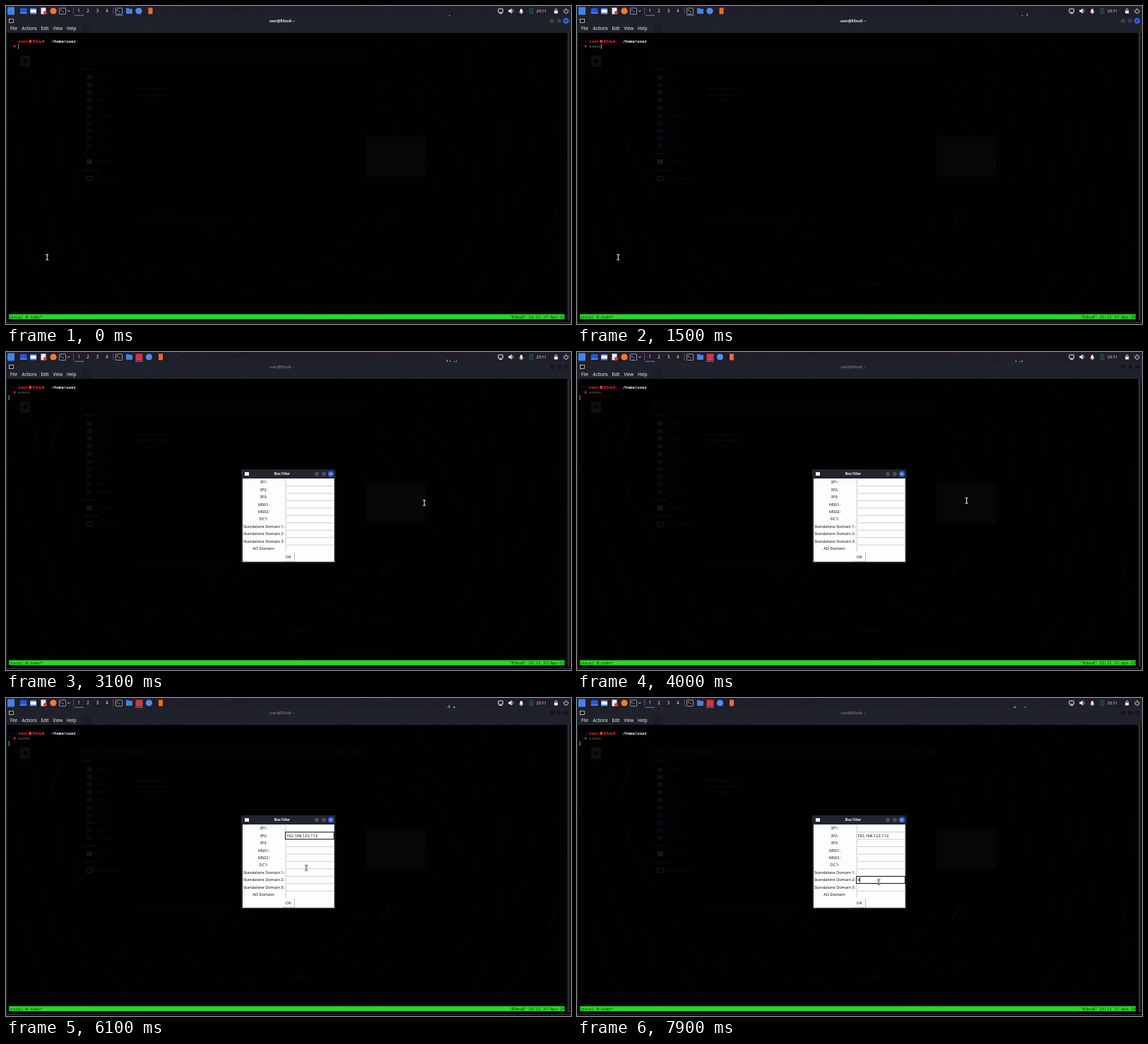
Recreate the animation shown at these times as an HTML page. Size 800 by 450 pixels, loop 8000 ms.

```html
<!DOCTYPE html>
<html lang="en">
<head>
<meta charset="utf-8">
<title>Terminal with a form</title>
<style>
html, body { margin: 0; width: 100%; height: 100%; overflow: hidden; background: #000; }
svg { display: block; width: 800px; height: 450px; }
text { font-family: "Noto Sans", "Open Sans", sans-serif; white-space: pre; }
.mono { font-family: "Noto Sans Mono", "DejaVu Sans Mono", monospace; font-size: 5.67px; }
</style>
</head>
<body>
<svg viewBox="0 0 800 450">
  <clipPath id="top"><path d="M0 0h800v14H0z"/></clipPath>
  <clipPath id="bars"><path d="M0 14h800v24H0z"/></clipPath>
  <g id="base"></g><g id="live"></g>
</svg>
<script>
const LOOP = 8000, HOST = 'R3nu8', USER = 'user', APP = 'Box Filler';
const COL = 3.4, LEFT = 3.7;
const LABELS = ['IP1', 'IP2', 'IP3', 'MS01', 'MS02', 'DC1', 'Standalone Domain 1',
  'Standalone Domain 2', 'Standalone Domain 3', 'AD Domain'];

const rect = (x, y, w, h, fill, extra = '') =>
  `<rect x="${x}" y="${y}" width="${w}" height="${h}" fill="${fill}" ${extra}/>`;
const disc = (x, y, r, fill, extra = '') =>
  `<circle cx="${x}" cy="${y}" r="${r}" fill="${fill}" ${extra}/>`;
const line = (d, stroke, w = 1) =>
  `<path d="${d}" fill="none" stroke="${stroke}" stroke-width="${w}"/>`;
const text = (x, y, s, fill, size, extra = '') =>
  `<text x="${x}" y="${y}" fill="${fill}" font-size="${size}" ${extra}>${s}</text>`;
const mid = (x, y, s, fill, size, extra = '') =>
  text(x, y, s, fill, size, `text-anchor="middle" ${extra}`);
const mono = (col, y, s, fill, bold) =>
  text(LEFT + col * COL, y, s, fill, 5.67, `class="mono" font-weight="${bold ? 700 : 400}"`);

// Swirling streaks of the wallpaper: angles from a0 over a span
function swirl(count, a0, span, rMin, rMax, tints) {
  let seed = 11, out = '';
  const rnd = () => (seed = seed * 16807 % 2147483647) / 2147483647;
  for (let i = 0; i < count; i++) {
    const r = rMin + rnd() * (rMax - rMin), a = a0 + rnd() * span, b = a + .03 + rnd() * .14;
    const at = q => `${(400 + r * Math.cos(q)).toFixed(1)} ${(220 + r * Math.sin(q)).toFixed(1)}`;
    out += line(`M${at(a)}A${r} ${r} 0 0 1 ${at(b)}`, tints[i % tints.length], .5 + rnd());
  }
  return out;
}

// File manager showing through the terminal
function ghost() {
  const ink = '#0a0d0e';
  let out = rect(105, 39, 403, 266, '#010102') + rect(105, 68, 403, 13, '#020303');
  for (const x of [116, 140, 153, 167, 475, 499]) out += disc(x, 75, 2.2, '#080a0a');
  out += text(176, 77, 'home', ink, 5);
  ['Computer', 'user', 'Desktop', 'Recent', 'Trash', 'Documents', 'Music', 'Pictures', 'Videos', 'Downloads']
    .forEach((s, i) => {
      const y = 101 + i * 10.8;
      out += rect(114, y - 3, 8, 6, i > 4 ? '#040a12' : '#0b0e10', 'rx="1"') + text(125, y + 2, s, ink, 5);
    });
  [['Places', 89], ['Devices', 209], ['Network', 232]].forEach(([s, y]) =>
    out += text(109, y + 2, s, '#0d1010', 5, 'font-weight="700"'));
  out += rect(114, 217, 8, 7, '#141617') + text(125, 222, 'File System', ink, 5);
  out += rect(114, 241, 8, 6, 'none', 'stroke="#1b1d1e"') + text(125, 246, 'Browse Network', ink, 5);
  ['Files_Example_list', 'and_some_Notes', '.pdf'].forEach((s, i) =>
    out += mid(206, 119 + i * 8, s, '#0f1212', 5.4));
  out += text(183, 300, '1 file: 23.4 MiB (24,536,064 bytes), Free space: 41 GiB', '#090b0b', 5.4);
  out += rect(20, 70, 14, 16, '#0e0f0f', 'rx="1"') + disc(27, 78, 3, '#040404');
  return out + mid(27, 99, 'Trash', '#0b0c0c', 5);
}

const terminalIcon = x => rect(x - 4.5, 3, 9, 8.5, '#14161c', 'stroke="#b9bcc4" stroke-width=".8" rx=".8"') +
  line(`M${x - 3} 5l1.5 1.2-1.5 1.2M${x - .5} 8h2.5`, '#e6e6e6', .7);

function panel() {
  const sky = tints => swirl(260, -2.75, 2.36, 200, 480, tints);
  let out = rect(0, 0, 800, 14, '#211d2a') + rect(0, 14, 800, 24, '#20222b');
  out += `<g clip-path="url(#top)">${sky(['#3a2040', '#191822', '#2b2533'])}</g>`;
  out += `<g clip-path="url(#bars)">${sky(['#23222d', '#1d1f27'])}</g>`;
  out += rect(108, 24, 13, 14, '#1b1d25') + rect(199, 29, 6, 6, '#1c2535');
  out += rect(2, 1.5, 10, 11, '#3d86ee', 'rx="1"');
  out += rect(20, 3, 9.5, 8, '#2457d8', 'rx=".6"') + rect(20, 9, 9.5, 2, '#4a7ff0');
  out += rect(34, 3, 9, 8.5, '#4b80ee', 'rx=".6"') + rect(34.5, 5, 8.5, 4.5, '#f0f3f8');
  out += rect(49.5, 2.5, 7, 9, '#eceef2') + disc(55.5, 9.5, 2.5, '#d93a3a');
  out += disc(67, 7, 4.6, '#f5792b') + terminalIcon(80);
  out += line('M87 6l1.8 2 1.8-2', '#ddd', .8);
  out += line('M95.5 2v10M152 2v10', '#62656f', .8);
  [103, 116, 129.5, 143].forEach((x, i) => out += mid(x, 9.2, i + 1, '#e4e6ea', 6.2));
  out += rect(97, 12.6, 13, 1.4, '#2f6be6') + terminalIcon(160);
  out += rect(170, 4, 9, 7, '#3d83e8', 'rx=".7"') + rect(170, 3, 4, 2, '#3d83e8');

  out += rect(697, 4, 6.5, 5, 'none', 'stroke="#f1f1f1" rx=".6"') + line('M698.5 10.5h4', '#f1f1f1');
  out += '<path d="M711.5 5.5h2l2.5-2.2v7.5l-2.5-2.2h-2z" fill="#f1f1f1"/>' +
    line('M717 4.5q2 2.5 0 5', '#f1f1f1', .8);
  out += '<path d="M726.5 9.5q1.2-1 1.2-3.3a1.8 2.2 0 0 1 3.7 0q0 2.3 1.2 3.3z" fill="#f1f1f1"/>' +
    disc(729.6, 10.4, .9, '#f1f1f1');
  out += rect(741.5, 3.5, 4.5, 7.5, '#143d28', 'stroke="#276645" stroke-width=".8" rx=".6"');
  out += text(751, 9.2, '23:11', '#f0f0f0', 5.6);
  out += rect(776.3, 6.5, 5, 4, '#f1f1f1') + line('M777.3 6.5v-1a1.5 1.6 0 0 1 3 0v1', '#f1f1f1', .9);
  out += line('M791.2 4.8a3 3 0 1 0 3.6 0M793 3v4', '#f1f1f1', .9);

  out += rect(4.5, 18.5, 6, 5, '#111', 'stroke="#d8d8d8" stroke-width=".8"');
  [['File', 6], ['Actions', 22.5], ['Edit', 49.5], ['View', 66.5], ['Help', 86]].forEach(([s, x]) =>
    out += text(x, 34.4, s, '#f2f2f2', 6.2, 'font-weight="500"'));
  return out;
}

function prompt() {
  const blue = '#142a80', red = '#ef3038';
  return mono(0, 52, '┌──(', blue) + mono(4, 52, 'root', red, 1) +
    disc(LEFT + 9 * COL, 50, 2.3, red) + mono(10, 52, HOST, red, 1) +
    mono(15, 52, ')-[', blue) + mono(18, 52, '/home/' + USER, '#f2f2f2', 1) + mono(28, 52, ']', blue) +
    mono(0, 59.2, '└─', blue) + mono(2, 59.2, '#', red, 1);
}

function statusBar() {
  const right = `"${HOST}" 23:11 17-Apr-25`;
  return rect(4, 436.2, 787, 7, '#22dc20') + mono(0, 441.6, '[oscp] 0:sudo*', '#063006') +
    text(791, 441.6, right, '#063006', 5.67, 'class="mono" text-anchor="end"');
}

const frame = () => rect(0, 38, 2, 412, '#15171d') + rect(795, 38, 2.8, 407, '#2e3035') +
  rect(797.8, 38, 2.2, 412, '#101116') + rect(0, 447, 800, 2, '#24262e');

base.innerHTML = rect(0, 0, 800, 450, '#010101') +
  swirl(300, 0, 6.283, 95, 440, ['#09060b', '#060608', '#0b060b']) + ghost() +
  rect(509, 185, 85, 57, '#060607') + panel() + frame() + prompt() + statusBar();

// Pointer stops: time, x, y
const PATH = [[0, 58, 355], [2400, 58, 355], [3000, 592, 213], [3800, 592, 213], [4700, 409, 199],
  [5400, 409, 199], [5800, 424, 231], [6000, 424, 231], [6100, 425, 240], [6300, 381, 288],
  [6400, 381, 288], [6800, 412, 246], [7000, 412, 246], [7300, 425, 248], [7400, 425, 248],
  [7600, 427, 260], [8000, 427, 260]];

function pointerAt(t) {
  const i = PATH.findIndex(p => p[0] > t), [t0, x0, y0] = PATH[i - 1], [t1, x1, y1] = PATH[i];
  const k = (t - t0) / (t1 - t0);
  return [x0 + (x1 - x0) * k, y0 + (y1 - y0) * k];
}

function pointer([x, y]) {
  const d = `M${x - 1.6} ${y - 3.3}h3.8M${x + .3} ${y - 3.3}v7.4M${x - 1.6} ${y + 4.1}h3.8`;
  return line(d, '#333', 1.9) + line(d, '#e8e8e8', .9);
}

// Load meter: birth time and height of each spike, drifting left
const SPIKES = [[-1200, 1], [600, 1], [1475, 3], [1970, 2], [2720, 1], [3100, 2], [4600, 1.5],
  [4850, 4], [5600, 2], [5800, 2], [7500, 1.5]];
const meter = t => SPIKES.map(([born, h]) => {
  const x = 637 - (t - born) * .008;
  return x > 637 || x < 618 ? '' : rect(x.toFixed(1), 14 - h, 1.4, h, h > 1 ? '#35c79a' : '#c9d6d6');
}).join('');

const tasks = open => {
  const x = open ? 202.5 : 188;
  return (open ? rect(183.5, 2.5, 10, 9.5, '#d4343f', 'rx=".6"') : '') +
    rect(open ? 183 : 155, 12.6, 11, 1.4, '#2f6be6') +
    disc(x, 7, 4.6, '#4a8df0') + rect(x + 13.5, 2.5, 6, 9, '#ee6a2e', 'rx=".6"');
};

function titleBar(active) {
  const out = mid(391, 22.9, `${USER}@${HOST}: ~`, active ? '#f0f0f0' : '#8d9098', 5,
    `font-weight="${active ? 700 : 500}"`);
  if (!active) return out + [773, 783, 793].map(x => disc(x, 21, 3.2, '#15171d')).join('');
  return out + disc(773, 21, 3, '#3b3e48') + disc(783, 21, 3, '#3b3e48') +
    disc(793, 21, 4, '#2d63e8') + line('M791.5 19.5l3 3m0-3l-3 3', '#0d1020', .8);
}

const rowY = i => 184.3 + 10.43 * i;

function form(t) {
  let out = '';
  LABELS.forEach((s, i) => {
    const y = rowY(i);
    out += mid(365, y + 2, s + ':', '#111', 5.6);
    out += line(`M396 ${y - 4.5}v9`, '#b4b6b4', .7);
    if (i < 9) out += line(`M396 ${y + 5.3}h68.5`, '#c3c5c3', .8);
  });
  out += mid(399.7, 292.3, 'OK', '#111', 5.6) + line('M408.5 284v12.3H391', '#a5a7a5', .8);
  const focus = t < 4800 ? -1 : t < 7500 ? 1 : 7;
  if (focus > 0) out += rect(395.5, rowY(focus) - 4.9, 69, 10, '#fff', 'stroke="#111"');
  if (t >= 5300) out += text(396.8, rowY(1) + 2.1, '192.168.122.112', '#111', 5.8);
  if (t >= 7700) out += text(396.8, rowY(7) + 2.1, 'd', '#111', 5.8);
  if (t >= 7500) out += rect(t < 7700 ? 397 : 400, rowY(7) - 3.5, .9, 7, '#111');
  return out;
}

function dialog(t) {
  let out = rect(333, 166, 133.5, 132.5, '#23252e', 'rx="1.5"') +
    rect(335, 179, 129.7, 117.8, '#fcfefb');
  out += rect(338, 170, 6, 5, '#f4f4f4') + mid(391, 174.3, APP, '#f2f2f2', 4.9, 'font-weight="700"');
  out += disc(440, 172.5, 3, '#4b4e58') + disc(450, 172.5, 3, '#4b4e58') +
    disc(460, 172.5, 4, '#2d63e8') + line('M458.5 171l3 3m0-3l-3 3', '#e8ecf8', .8);
  return out + (t >= 2200 ? form(t) : line('M396 200v84', '#f3f5f2', .8));
}

const start = performance.now();

function draw() {
  const t = Math.floor((performance.now() - start) % LOOP / 100) * 100;
  const open = t >= 2000, entered = t >= 1800;
  const typed = 'ezenv'.slice(0, Math.max(0, Math.floor((t - 300) / 200)));
  const col = entered ? 0 : 4 + typed.length;
  live.innerHTML = tasks(open) + meter(t) + titleBar(!open) +
    mono(4, 59.2, typed, entered ? '#66746f' : '#4f967b') +
    rect(LEFT + col * COL, entered ? 61 : 54, .8, 7, '#bfc2c2') +
    (open ? dialog(t) : '') + pointer(pointerAt(t));
  requestAnimationFrame(draw);
}
draw();
</script>
</body>
</html>
```
